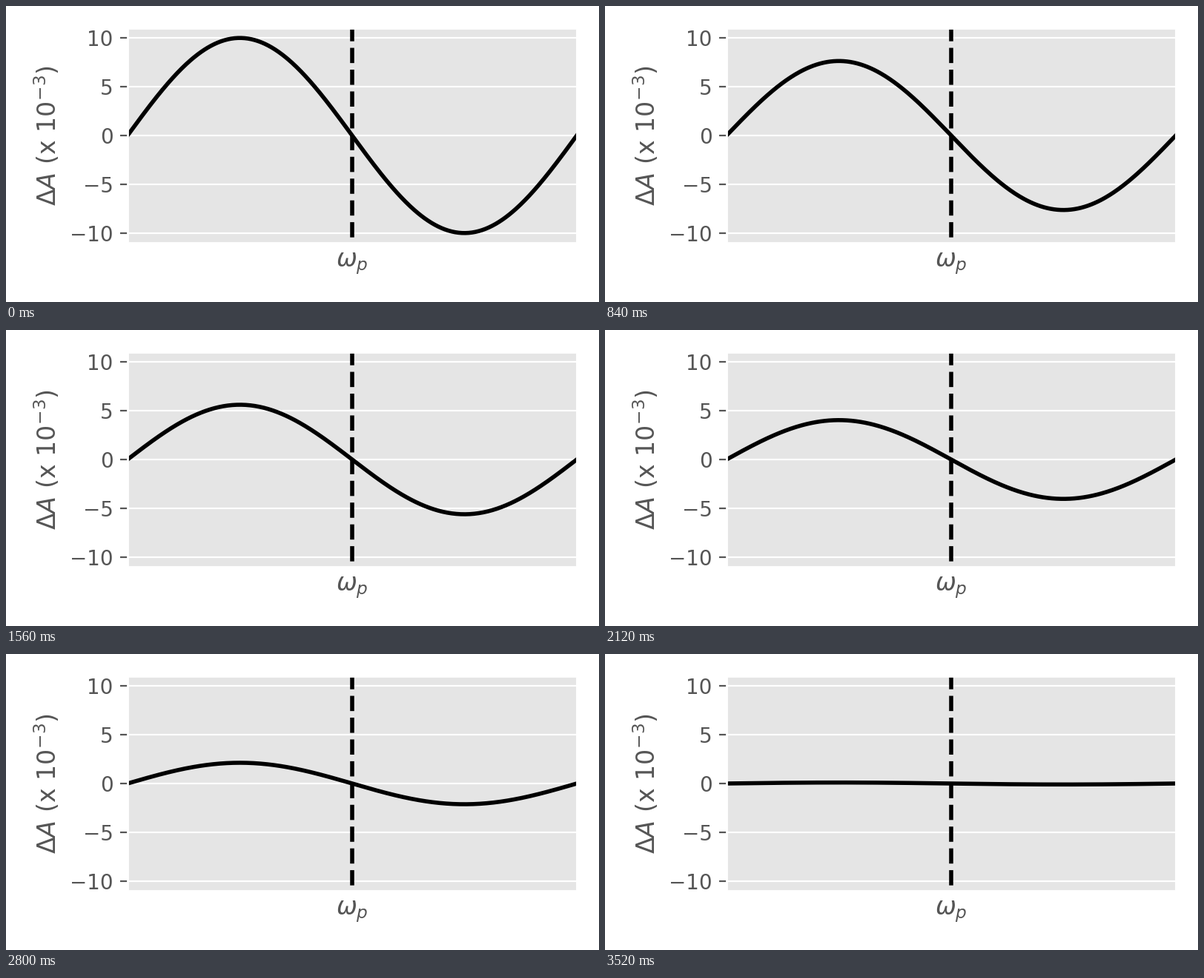
A matplotlib script that plays this animation: 800x400 px, repeating every 3560 ms.

```python
import numpy as np
import matplotlib.pyplot as plt
from matplotlib.animation import FuncAnimation

FRAMES = 89
INTERVAL = 40  # ms

plt.style.use("ggplot")
fig, ax = plt.subplots(figsize=(4, 2), dpi=200)
fig.subplots_adjust(left=164 / 800, right=770 / 800, bottom=80 / 400, top=370 / 400)

x = np.linspace(0, 2 * np.pi, 400)
wave = np.sin(x)
amplitudes = np.linspace(10, 0.1, FRAMES)

curve, = ax.plot(x, amplitudes[0] * wave, color="black", lw=2)
# The marker runs past the figure edges, which sets the dash phase.
ax.plot([np.pi, np.pi], [-20, 20], color="black", lw=2, ls="--")

ax.set_xlim(0, 2 * np.pi)
ax.set_ylim(-11, 11)
ax.set_xticks([])
ax.set_yticks([-10, -5, 0, 5, 10])
ax.set_xlabel(r"$\omega_p$")
ax.set_ylabel(r"$\Delta A$ (x 10$^{-3}$)")


def update(i):
    curve.set_ydata(amplitudes[i] * wave)
    return curve,


anim = FuncAnimation(fig, update, frames=FRAMES, interval=INTERVAL, repeat=True)
plt.show()
```
